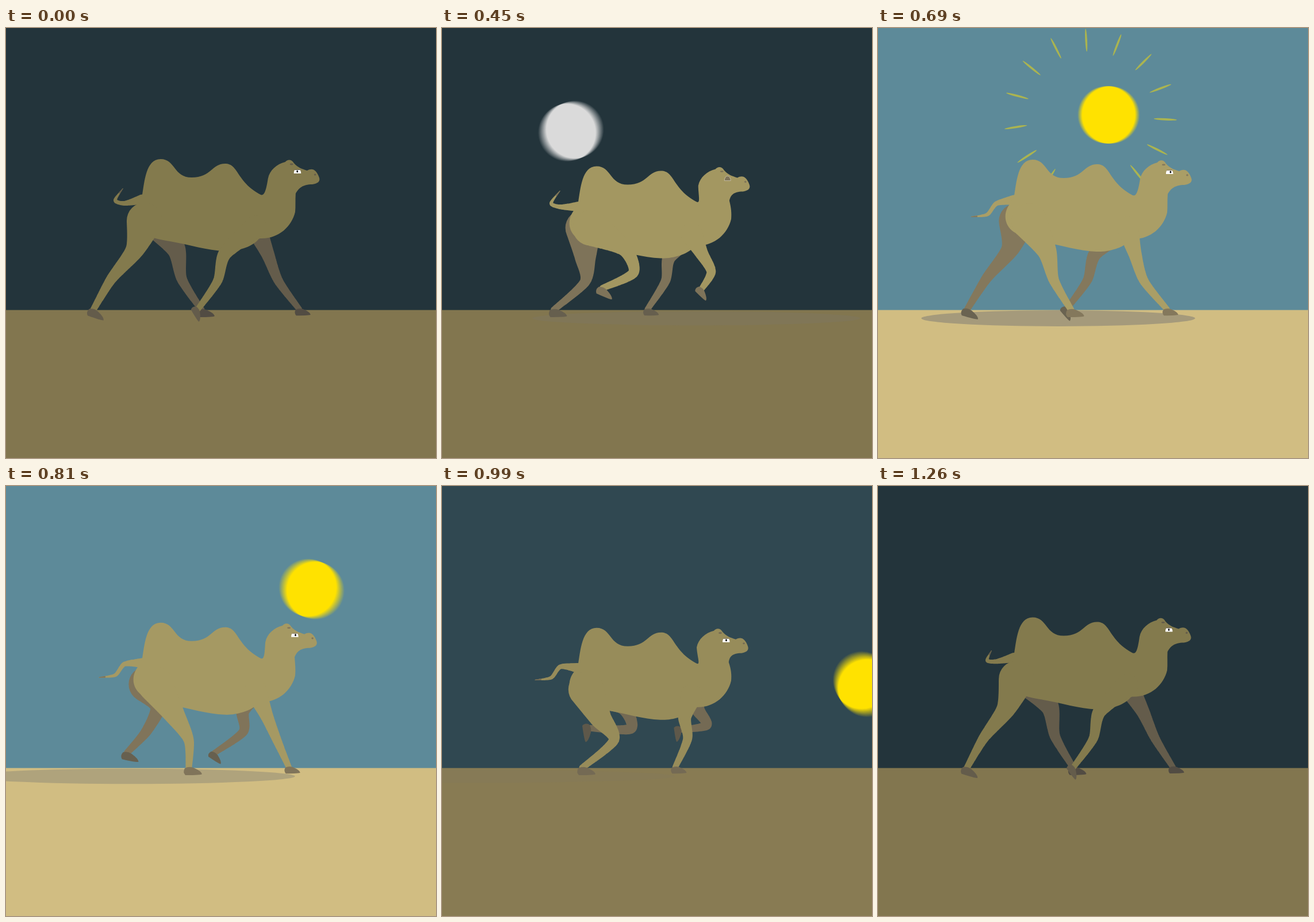
Write an HTML page with a canvas that moves like this. It is 748x748 px and loops after 1.29 s.

```html
<!DOCTYPE html>
<html lang="en">
<head>
<meta charset="utf-8">
<title>Walking camel</title>
<style>
  html, body { margin: 0; width: 100%; height: 100%; overflow: hidden; background: #23343b; }
  canvas { display: block; }
</style>
</head>
<body>
<canvas id="stage" width="748" height="748"></canvas>
<script>
const SIZE = 748, LOOP = 1290, STEP = 30, HORIZON = 490.6;
const { PI, sin, cos, abs, max, min, sign, hypot, floor } = Math;
const TURN = 2 * PI, DEG = PI / 180;
const ctx = document.getElementById('stage').getContext('2d');
const blur = Object.assign(document.createElement('canvas'), { width: SIZE, height: SIZE }).getContext('2d');

const bodyPath = `M237 290C241 268 243 228 269 228C295 228 291 260 323 260C357 260 358 236 381 236
  C405 236 400 267 443 290C450 293 453 280 456 262C459 247 471 237 486 233C490 228 497 228 501 235
  C508 243 515 245 524 248C533 243 540 246 545 260C548 268 540 271 533 272C516 272 509 279 504 288
  C503 300 504 310 503 320C497 345 475 366 445 366C441 366 440 366 437 370C425 382 400 389 380 388
  C350 387 320 377 285 371C260 367 250 364 240 356C219 345 216 320 231 303Z`;
const hoofPath = new Path2D('M-7 1Q0-3 8 0Q22 6 23 11Q22 13 -6 13Q-11 8 -7 1Z');
const eyePath = new Path2D('M501 253Q501 248 503 246.5H511Q513.5 248 513.5 253Z');

const clamp = (v, lo, hi) => max(lo, min(hi, v));

function ramp(t, from, to) {
  const u = clamp((t - from) / (to - from), 0, 1);
  return u * u * (3 - 2 * u);
}

function mix(a, b, f) {
  return `rgb(${a.map((v, i) => Math.round(v + (b[i] - v) * f))})`;
}

function dot(x, y, rx, ry, color, angle = 0) {
  ctx.fillStyle = color;
  ctx.beginPath();
  ctx.ellipse(x, y, rx, ry, angle, 0, 7);
  ctx.fill();
}

// Gait: phase 0 is fully stretched back, PI fully stretched forward; the foot is in the air between
function hindLeg(p, bob) {
  const s = sin(p), c = cos(p), lift = max(0, s) ** 3;
  const hip = [252 - 11 * c, 335 + bob, 62];
  const hock = [244.5 - 61.5 * c + 8 * s + 70 * s * s, 437 - 10 * s - 5 * s * s, 18];
  const thigh = [(hip[0] + hock[0]) / 2 + 12 + 12 * s, (hip[1] + hock[1]) / 2 - 4 * s, 32 - 6 * s];
  const ankle = [246 - 86 * c - 8 * cos(3 * p) + 11 * s * s + 12 * sin(2 * p) - 8 * sin(4 * p), 490 - 70 * lift, 11];
  return { joints: [hip, thigh, hock, ankle], tilt: 85 * lift ** 2 + 20 * max(0, c) ** 8, hoof: 1 };
}

function frontLeg(p, bob) {
  const s = sin(p), c = cos(p), lift = max(0, s) ** 3;
  const shoulder = [434, 345 + bob, 38];
  const knee = [421 - 53 * c + 11 * s + 30 * s * s + 4 * sin(2 * p) - 14 * sin(4 * p), 440 - 24 * max(0, s) ** 2, 16];
  const thigh = [427 + .7 * (knee[0] - 434), (shoulder[1] + knee[1]) / 2, 23];
  const ankle = [422 - 88 * c - 5 * s - 5 * s * s + 7 * sin(2 * p) - 12 * sin(4 * p), 489 - 66 * lift, 10];
  return { joints: [shoulder, thigh, knee, ankle], tilt: 84 * lift + 60 * max(0, c) ** 8, hoof: .86 };
}

function hermite(a, b, ta, tb, u) {
  const w = 1 - u;
  return a + (b - a) * u * u * (3 - 2 * u) + ta * u * w * w - tb * u * u * w;
}

// Tapered limb: discs along a smooth line of [x, y, width] points
function limb(points, color, from = 0) {
  const last = points.length - 1, at = i => points[clamp(i, 0, last)];
  ctx.fillStyle = color;
  ctx.beginPath();
  for (let s = from; s <= last; s += 1 / 32) {
    const i = min(floor(s), last - 1);
    const [x, y, w] = at(i).map((v, k) => hermite(v, at(i + 1)[k],
      .38 * (at(i + 1)[k] - at(i - 1)[k]), .38 * (at(i + 2)[k] - v), s - i));
    ctx.moveTo(x + w / 2, y);
    ctx.arc(x, y, max(w / 2, .4), 0, 7);
  }
  ctx.fill();
}

function drawLeg({ joints, tilt, hoof }, color, hoofColor) {
  limb(joints, color);
  const [x, y] = joints[3];
  ctx.save();
  ctx.translate(x, y);
  ctx.rotate(tilt * DEG);
  ctx.scale(hoof, hoof);
  ctx.fillStyle = hoofColor;
  ctx.fill(hoofPath);
  ctx.restore();
}

// Degrees from the zenith, slowing down near the top
function orbAngle(time) {
  const u = time - 630;
  return sign(u) * .22 * (hypot(u, 120) - 120);
}

function drawOrb(time, color) {
  const shots = 15, shutter = 11;
  blur.globalCompositeOperation = 'source-over';
  blur.clearRect(0, 0, SIZE, SIZE);
  blur.globalCompositeOperation = 'lighter';
  blur.fillStyle = `rgba(255,255,255,${1 / shots})`;
  for (let i = 0; i < shots; i++) {
    const a = orbAngle(time + (i / (shots - 1) - .5) * shutter) * DEG;
    blur.beginPath();
    blur.arc(378 + 425 * sin(a), 575.5 - 425 * cos(a), 50, 0, 7);
    blur.fill();
  }
  blur.globalCompositeOperation = 'source-in';
  blur.fillStyle = color;
  blur.fillRect(0, 0, SIZE, SIZE);
  ctx.drawImage(blur.canvas, 0, 0);
}

function drawRays(time) {
  const p = (time - 570) / 240;
  if (p <= 0 || p >= 1) return;
  for (let i = 0; i < 15; i++) {
    const a = (3 + 24 * i) * DEG, r = 40 + 182 * p;
    dot(369 + r * cos(a), 152 + r * sin(a), 20, 1.8, `rgba(255,226,0,${.48 * sin(PI * p)})`, a);
  }
}

function drawShadow(time, day) {
  const angle = orbAngle(time);
  const opacity = (.3 + .2 * day) * max(0, 1 - abs(angle) / 80);
  ctx.save();
  ctx.beginPath();
  ctx.rect(0, HORIZON, SIZE, SIZE);
  ctx.clip();
  dot(330 - 5.3 * angle, 505, 230 + 2.6 * abs(angle), 11 + 6 * opacity, `rgba(117,117,115,${opacity})`);
  ctx.restore();
}

function drawTail(time, bob, color, tipColor) {
  const sway = clamp(2 * cos(TURN * (time - 230) / LOOP), -1, 1), sag = bob / 2;
  const tail = [
    [237, 298 + bob, 17],
    [206, 305 + sag, 8],
    [190, 311 - 13 * sway + sag, 6],
    [184 + 22 * sway, 302 - 26 * sway + sag, 1]
  ];
  limb(tail, color);
  limb(tail, tipColor, 2.6);
}

// The head sways while the neck stays rooted in the chest
function drawBody(time, bob, nod, color, dark) {
  const outline = bodyPath.replace(/(\d+) (\d+)/g, (_, x, y) =>
    `${+x + (x > 450 ? nod * clamp((300 - y) / 30, 0, 1) : 0)} ${y}`);
  ctx.save();
  ctx.translate(0, bob);
  ctx.fillStyle = color;
  ctx.fill(new Path2D(outline));
  ctx.translate(nod, 0);
  drawFace(time, dark);
  ctx.restore();
}

function drawFace(time, dark) {
  dot(497, 237, 3, 1.4, dark);
  dot(538, 255, 1.8, 1.6, dark);
  if (time >= 420 && time < 510) {
    ctx.beginPath();
    ctx.ellipse(507, 253, 5.5, 8, 0, PI, 0);
    ctx.closePath();
    ctx.fillStyle = dark;
    ctx.fill();
    ctx.strokeStyle = '#d2cbb0';
    ctx.lineWidth = .8;
    ctx.stroke();
    return;
  }
  ctx.fillStyle = '#fff';
  ctx.fill(eyePath);
  ctx.fillStyle = dark;
  ctx.fillRect(502.5, 246, 9, 1);
  dot(507 + 2 * sin(PI * time / LOOP) ** 4, 249.5, 1.4, 2, '#111');
}

function draw(time) {
  const phase = TURN * time / LOOP;
  const dawn = ramp(time, 550, 660);
  const sky = dawn - ramp(time, 880, 1040);
  const ground = dawn - ramp(time, 840, 1020);
  const glow = sin(phase / 2) ** 1.7;
  const near = mix([131, 122, 77], [170, 158, 102], glow);
  const far = mix([100, 92, 75], [132, 120, 92], glow);
  const farHoof = mix([82, 76, 67], [106, 99, 81], glow);
  const bob = 9.5 * (1 - cos(2 * phase));
  const nod = -6.5 * (1 - cos(2 * phase - .29));

  ctx.fillStyle = mix([35, 52, 59], [93, 138, 153], sky);
  ctx.fillRect(0, 0, SIZE, SIZE);
  drawRays(time);
  drawOrb(time, mix([218, 218, 218], [255, 226, 0], dawn));
  ctx.fillStyle = mix([130, 118, 79], [209, 189, 130], ground);
  ctx.fillRect(0, HORIZON, SIZE, SIZE - HORIZON);
  drawShadow(time, ground);

  drawLeg(hindLeg(phase + PI, bob), far, farHoof);
  drawLeg(frontLeg(phase + PI, bob), far, farHoof);
  drawTail(time, bob, near, far);
  drawBody(time, bob, nod, near, far);
  drawLeg(hindLeg(phase, bob), near, far);
  drawLeg(frontLeg(phase, bob), near, far);
}

const start = performance.now();
function tick() {
  const time = (performance.now() - start) % LOOP;
  draw(floor(time / STEP) * STEP);
  requestAnimationFrame(tick);
}
tick();
</script>
</body>
</html>
```
